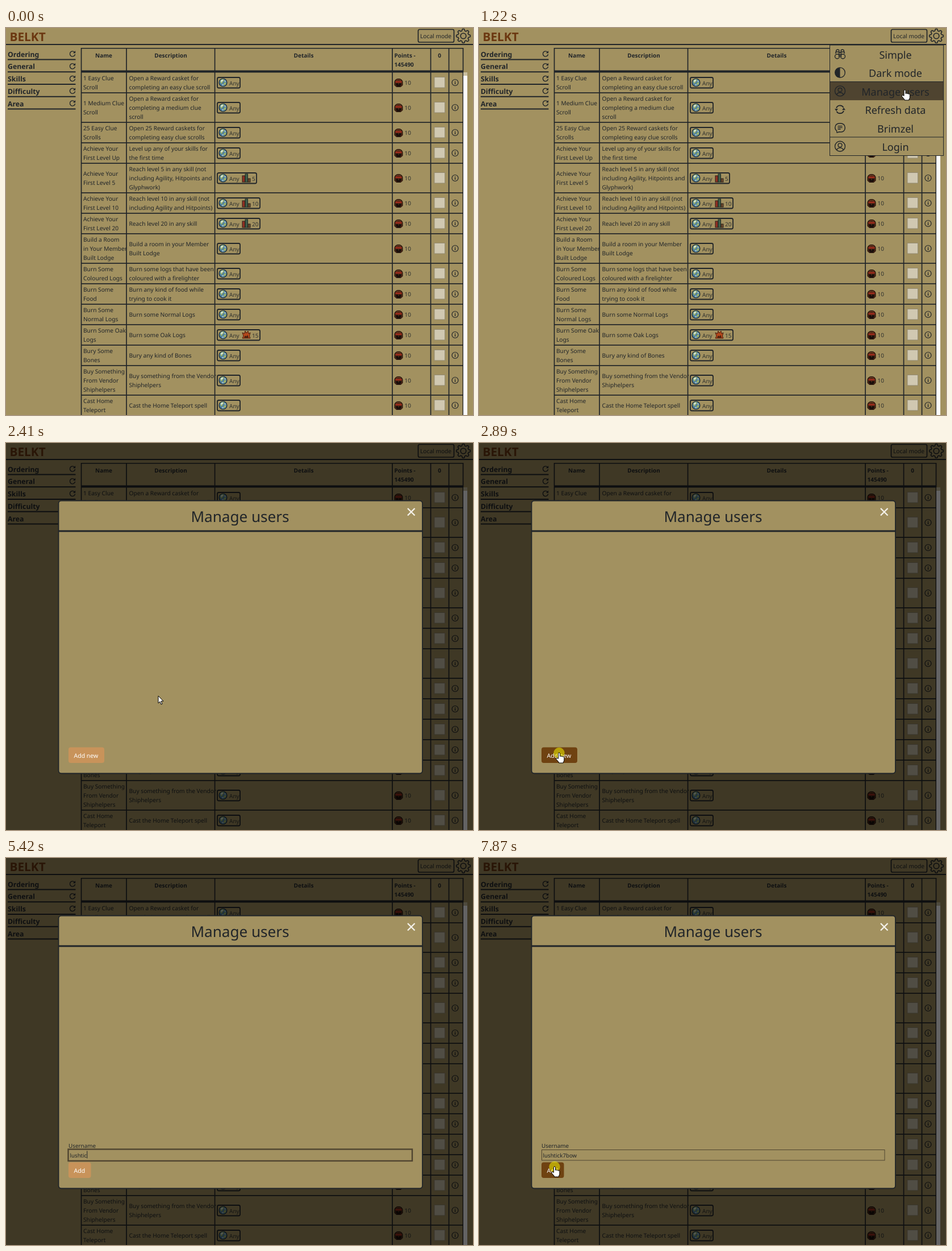
Recreate the animation shown at these times as an HTML page. Size 822 by 681 pixels, loop 8000 ms.

```html
<!DOCTYPE html>
<html lang="en">
<head>
<meta charset="utf-8">
<title>Task list</title>
<style>
html, body { margin: 0; width: 100%; height: 100%; overflow: hidden; background: #a29160; }
svg { display: block; width: 822px; height: 681px; }
text { font-family: "Noto Sans", "Open Sans", sans-serif; fill: #212529; text-rendering: geometricPrecision; }
</style>
</head>
<body>
<svg id="stage" viewBox="0 0 822 681"></svg>
<script>
const LOOP = 8000, INK = '#212529', PAPER = '#a29160', BUTTON = '#c8935a', BUTTON_HOVER = '#6f4211', SHADE = '#4f4430';
const USERNAME = 'lushtick7bow';

const text = (x, y, s, size = 10.2, attrs = '') => `<text x="${x}" y="${y}" font-size="${size}" ${attrs}>${s}</text>`;
const rect = (x, y, w, h, fill, attrs = '') => `<rect x="${x}" y="${y}" width="${w}" height="${h}" fill="${fill}" ${attrs}/>`;
const path = (d, attrs = '') => `<path d="${d}" ${attrs}/>`;
const circle = (x, y, r, attrs = '') => `<circle cx="${x}" cy="${y}" r="${r}" ${attrs}/>`;
const at = (x, y, body) => `<g transform="translate(${x} ${y})">${body}</g>`;
const line = (width, cap = 'butt') => `fill="none" stroke="${INK}" stroke-width="${width}" stroke-linecap="${cap}"`;
const BOLD = 'font-weight="700"', MIDDLE = 'text-anchor="middle"';

// Each row: name, description, optional skill icon and level
const rows = [
  ['1 Easy Clue|Scroll', 'Open a Reward casket for|completing an easy clue scroll'],
  ['1 Medium Clue|Scroll', 'Open a Reward casket for|completing a medium clue|scroll'],
  ['25 Easy Clue|Scrolls', 'Open 25 Reward caskets for|completing easy clue scrolls'],
  ['Achieve Your|First Level Up', 'Level up any of your skills for|the first time'],
  ['Achieve Your|First Level 5', 'Reach level 5 in any skill (not|including Agility, Hitpoints and|Glyphwork)', 'bars', 5],
  ['Achieve Your|First Level 10', 'Reach level 10 in any skill (not|including Agility and Hitpoints)', 'bars', 10],
  ['Achieve Your|First Level 20', 'Reach level 20 in any skill', 'bars', 20],
  ['Build a Room|in Your Member|Built Lodge', 'Build a room in your Member|Built Lodge'],
  ['Burn Some|Coloured Logs', 'Burn some logs that have been|coloured with a firelighter'],
  ['Burn Some|Food', 'Burn any kind of food while|trying to cook it'],
  ['Burn Some|Normal Logs', 'Burn some Normal Logs'],
  ['Burn Some Oak|Logs', 'Burn some Oak Logs', 'fire', 15],
  ['Bury Some|Bones', 'Bury any kind of Bones'],
  ['Buy Something|From Vendor|Shiphelpers', 'Buy something from the Vendor|Shiphelpers'],
  ['Cast Home|Teleport', 'Cast the Home Teleport spell'],
];

const icons = {
  globe: circle(0, 0, 7, 'fill="#4f7f9e" stroke="#1d2a30" stroke-width="1.2"')
    + path('M-5 -3Q-3 -6.5 1 -6L2 -3 -1 -1 -1.5 2 -4 1zM1 1L5 -1 5 3 2 5z', 'fill="#9db46a"')
    + path('M-4 -3.5L-.5 -5.5 0 -3 -3 -.5zM2.5 -4L5 -2.5 3 -1zM-2 3.5L1 3 0 5.5z', 'fill="#d3e2e0"'),
  bars: rect(-7, -4, 4.5, 11, '#8f3023', 'stroke="#2b211a"') + rect(-2, -7, 4.5, 14, '#3f5d4a', 'stroke="#202a22"')
    + rect(3, 1, 4, 6, '#6e4a2c', 'stroke="#2b211a"'),
  fire: path('M-7 6L-5 2 -7 -4 -3.5 -2 -2 -7 0 -3 3 -7 4 -2 7 -4 5.5 2 7 6z', 'fill="#b4481b" stroke="#4a1c0d"')
    + path('M-4 5L-2 1 0 3 2 0 4 5z', 'fill="#48200f"'),
  helmet: path('M-7 -2Q-6 -7 0 -7T7 -2V4L4 7H-4L-7 4z', 'fill="#4b2413" stroke="#1b100b"')
    + rect(-5.5, -3, 11, 2.6, '#a02c1d') + path('M-4.5 1H-1V3H1V1H4.5V4L2.5 6H-2.5L-4.5 4z', 'fill="#140d0a"')
    + path('M-4 -4.5Q0 -7 4 -4.5', 'fill="none" stroke="#7a4528"'),
  info: circle(0, 0, 5.5, line(1.2)) + rect(-.6, -1, 1.3, 4, INK) + rect(-.6, -3, 1.3, 1.2, INK),
  reload: path('M3.6 -2.9A4.6 4.6 0 1 0 4.6 .6', line(1.4)) + path('M5.2 -5.5V-1.2H.9z', `fill="${INK}"`),
  binoculars: path('M-8 -1L-6.5 -7Q-4 -9 -1.8 -7V5M8 -1L6.5 -7Q4 -9 1.8 -7V5M-1.8 -3H1.8M-1.8 1H1.8M-7 -4H-1.8M1.8 -4H7', line(1.4))
    + circle(-5, 4, 4, line(1.4)) + circle(5, 4, 4, line(1.4)),
  contrast: circle(0, 0, 8.8, line(1.4)) + path('M0 -8.8A8.8 8.8 0 0 0 0 8.8z', `fill="${INK}"`),
  person: circle(0, 0, 9, line(1.4)) + circle(0, -2, 3.4, line(1.4)) + path('M-6 6.4Q-4 2.6 0 2.6T6 6.4', line(1.4)),
  refresh: path('M-6.5 -2.5A7 7 0 0 1 6 -3.5M6.5 2.5A7 7 0 0 1 -6 3.5', line(1.8))
    + path('M-9.5 -1H-3.5L-6.5 3zM9.5 1H3.5L6.5 -3z', `fill="${INK}"`),
  chat: path('M-5.5 8.2Q-3 8 -2 7Q8.8 8.5 8.8 -.7Q8.3 -8 0 -8T-8.8 -.7Q-8.8 3 -5.8 5.2z', line(1.4))
    + path('M-4 -3.2H4M-4 -.5H4M-4 2.2H1', line(1.3)),
};

function gear(cx, cy) {
  const n = 128, pts = [];
  for (let i = 0; i < n; i++) {
    const a = i / n * 2 * Math.PI;
    const r = 10.8 + 1.5 * Math.max(-1, Math.min(1, 1.8 * Math.cos(8 * a)));
    pts.push((cx + r * Math.cos(a)).toFixed(1) + ' ' + (cy + r * Math.sin(a)).toFixed(1));
  }
  return path('M' + pts.join('L') + 'z', line(1.6)) + circle(cx, cy, 4.8, line(1.6));
}

function cell(x, center, content) {
  const lines = content.split('|');
  return lines.map((s, i) => text(x, center + 4 + (i - (lines.length - 1) / 2) * 15.7, s)).join('');
}

function tableRow([name, description, skill, level], center) {
  const faint = 'fill-opacity=".88"';
  const width = skill ? (level > 9 ? 75 : 69) : 40;
  return cell(136, center, name) + cell(216.5, center, description)
    + rect(372, center - 9, width, 18.5, 'none', `rx="2.5" stroke="${INK}" stroke-width="1.8"`)
    + at(382, center, icons.globe) + text(393, center + 4.5, 'Any', 10, faint)
    + (skill ? at(423, center, icons[skill]) + text(433, center + 4.5, level, 10, faint) : '')
    + at(691, center + .5, icons.helmet) + text(701.5, center + 4, 10, 10, faint)
    + rect(754, center - 9.5, 18.5, 18.5, '#d0c8b1', 'stroke="#938a72"')
    + at(790.5, center, icons.info);
}

function page() {
  let out = rect(0, 0, 822, 681, PAPER)
    + text(6.5, 22.5, 'BELKT', 20.8, BOLD + ' style="fill:#6b3710"')
    + rect(0, 28, 822, 2, INK)
    + rect(725.5, 2.5, 63, 22.5, 'none', `rx="2.5" stroke="${INK}" stroke-width="1.7"`)
    + text(729, 17.5, 'Local mode') + gear(805, 14);
  ['Ordering', 'General', 'Skills', 'Difficulty', 'Area'].forEach((label, i) => {
    const y = 45.5 + i * 21.75;
    out += text(3, y + 5, label, 12.3, BOLD) + at(117, y, icons.reload) + rect(3, y + 9, 119.5, 2, INK);
  });
  out += text(172, 51.5, 'Name', 10, BOLD + MIDDLE.padStart(21)) + text(290, 51.5, 'Description', 10, BOLD + ' ' + MIDDLE)
    + text(524, 51.5, 'Details', 10, BOLD + ' ' + MIDDLE) + text(683.5, 51.5, 'Points -', 10, BOLD)
    + text(683.5, 67.5, '145490', 10, BOLD) + text(763, 51.5, '0', 10, BOLD + ' ' + MIDDLE)
    + rect(132, 35, 673, 1.5, INK) + rect(132, 74.5, 673, 4, INK)
    + [132.5, 212, 367.5, 680, 747.5, 779.5, 804.5].map(x => rect(x - .8, 35, 1.7, 646, INK)).join('')
    + rect(805, 78, 7, 6, '#c9bfa0') + rect(805, 84, 7, 597, '#fff');
  let top = 78;
  for (const row of rows) {
    const height = /\|.*\|/.test(row[0]) || /\|.*\|/.test(row[1]) ? 52 : 36;
    out += tableRow(row, top + height / 2);
    top += height;
    out += rect(132, top - .8, 673, 1.7, INK);
  }
  return out;
}

const modal = rect(0, 0, 822, 681, '#000', 'opacity=".61"')
  + rect(92.5, 101.5, 640.5, 480, PAPER, `rx="5" stroke="${INK}" stroke-width="1.8"`)
  + text(412, 139, 'Manage users', 26.1, MIDDLE) + rect(93, 153.5, 640, 3, INK)
  + path('M707 115L719.5 127.5M719.5 115L707 127.5', 'stroke="#f3f0e8" stroke-width="2.4"')
  + `<g id="form">${text(110, 510, 'Username', 9.9)}<rect id="field" fill="none" stroke="${SHADE}"/>`
  + `${text(112.5, 526.5, '', 9.7, 'id="typed"')}${rect(0, 515.5, 1, 13, INK, 'id="caret"')}</g>`
  + rect(110, 535.5, 63, 27.5, BUTTON, 'id="button" rx="4"') + text(119.5, 554, '', 10.5, 'id="buttonLabel" style="fill:#fff"');

const menuItems = [['Simple', 'binoculars'], ['Dark mode', 'contrast'], ['Manage users', 'person'],
  ['Refresh data', 'refresh'], ['Brimzel', 'chat'], ['Login', 'person']];
const menu = rect(617.5, 30, 200, 194.5, PAPER, `stroke="${INK}"`)
  + rect(618, 0, 199, 32.3, SHADE, 'id="hover"')
  + rect(617.5, 94, 200, 1, INK) + rect(617.5, 191.5, 200, 1, INK)
  + menuItems.map(([label, icon], i) => at(635.5, 46 + i * 32.45, icons[icon])
    + text(733, 53.7 + i * 32.5, label, 18, MIDDLE)).join('');

const OUTLINE = 'fill="#fff" stroke="#000" stroke-width="1" stroke-linejoin="round"';
const pointers = {
  hand: path('M-1.5 10.5V1.5a1.5 1.5 0 0 1 3 0V6.5a1.4 1.4 0 0 1 2.6 .4a1.4 1.4 0 0 1 2.6 .5a1.3 1.3 0 0 1 2.2 1V13q0 2 -1.5 3.3V18H-.5V16.8L-5 11.5q-.8 -2 .8 -2.2Q-3 9.2 -1.5 10.5z', OUTLINE),
  arrow: path('M0 0V12.8L2.9 10 5 15 7 14.1 4.9 9.2H9z', OUTLINE),
  beam: path('M-2.5 -6.5H2.5M0 -6.5V6.5M-2.5 6.5H2.5', `stroke="${INK}" stroke-width="1" fill="none"`),
};

const stage = document.getElementById('stage');
stage.innerHTML = `<g>${page()}</g><g id="modal">${modal}</g><g id="menu">${menu}</g>`
  + `<circle id="click" r="9.7" fill="#ff0" opacity=".5"/><g id="pointer">`
  + Object.entries(pointers).map(([id, body]) => `<g id="${id}">${body}</g>`).join('') + '</g>';

const el = id => document.getElementById(id);
const show = (id, on) => el(id).setAttribute('display', on ? 'inline' : 'none');
const set = (id, attrs) => { for (const k in attrs) el(id).setAttribute(k, attrs[k]); };
const during = (t, spans) => spans.some(([a, b]) => t >= a && t < b);

// Pointer hotspot: time, x, y
const route = [[30, 804.5, 15.5], [470, 804.5, 15.5], [1200, 749.5, 109], [1829, 749.5, 109], [1830, 748, 110],
  [2070, 748, 110], [2410, 268, 445], [2840, 141, 545], [3010, 141, 545], [3420, 180, 522.5],
  [3830, 180, 522.5], [3870, 177, 522.5], [7300, 177, 522.5], [7750, 133, 543]];
const keyTimes = [4110, 4650, 4790, 4930, 5210, 5250, 5420, 5620, 5720, 6260, 6360, 6460];
const clicks = [[200, 330], [2890, 3000], [3560, 3670], [7830, LOOP]];
const caretOff = [[3840, 4110], [4620, 4650], [5070, 5210], [5890, 6260], [6600, 6840], [7370, LOOP]];

function pointerAt(t) {
  const i = route.findIndex(p => p[0] > t);
  if (i < 0) return route[route.length - 1].slice(1);
  if (i === 0) return route[0].slice(1);
  const [t0, x0, y0] = route[i - 1], [t1, x1, y1] = route[i];
  const u = (t - t0) / (t1 - t0), e = u * u * (3 - 2 * u);
  return [x0 + (x1 - x0) * e, y0 + (y1 - y0) * e];
}

function render(t) {
  const [x, y] = pointerAt(t);
  const menuOpen = t >= 470 && t < 2190, modalOpen = t >= 1250, formOpen = t >= 3000;
  const overButton = modalOpen && x > 110 && x < (formOpen ? 149.5 : 173) && y > 535.5 && y < 563;
  const overField = formOpen && y > 513 && y < 533;
  const row = Math.floor((y - 30) / 32.4);
  const overMenu = menuOpen && x > 617 && x < 817 && row >= 0 && row < 6;

  show('menu', menuOpen);
  show('hover', overMenu);
  set('hover', { y: 30 + row * 32.4 });
  show('modal', modalOpen);
  show('form', formOpen);

  const focused = t >= 3560 && t < 7830;
  set('field', focused
    ? { x: 109.5, y: 512.5, width: 605.5, height: 20.5, 'stroke-width': 2.4 }
    : { x: 110.5, y: 513.5, width: 603.5, height: 18.5, 'stroke-width': 1 });
  const typed = el('typed');
  typed.textContent = USERNAME.slice(0, keyTimes.filter(k => t >= k).length);
  show('caret', focused && !during(t, caretOff));
  if (formOpen) set('caret', { x: 112.5 + (typed.textContent ? typed.getComputedTextLength() : 0) });

  set('button', { width: formOpen ? 39.5 : 63, fill: overButton ? BUTTON_HOVER : BUTTON });
  el('buttonLabel').textContent = formOpen ? 'Add' : 'Add new';

  const kind = t < 470 || overMenu || overButton ? 'hand' : overField ? 'beam' : 'arrow';
  for (const id in pointers) show(id, id === kind);
  show('pointer', t >= 30 && !(t >= 4110 && t < 7320));
  set('pointer', { transform: `translate(${x} ${y})` });
  show('click', during(t, clicks));
  set('click', { cx: x, cy: y + .5 });
}

const start = performance.now();
function tick() {
  render((performance.now() - start) % LOOP);
  requestAnimationFrame(tick);
}
tick();
</script>
</body>
</html>
```
